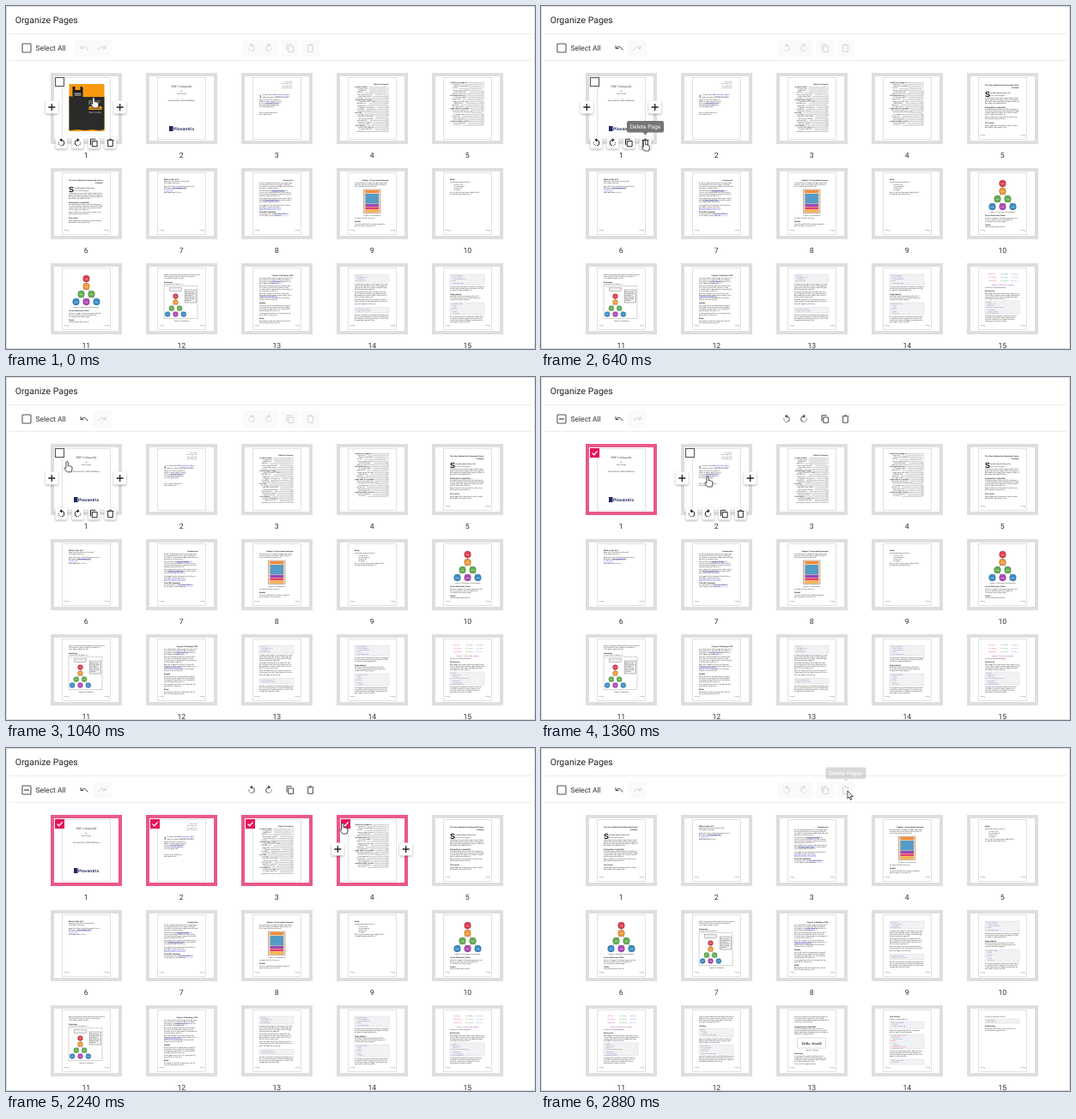
Recreate the animation shown at these times as an HTML page. Size 616 by 400 pixels, loop 2.96 s.

```html
<!DOCTYPE html>
<html lang="en">
<head>
<meta charset="utf-8">
<title>Organize Pages</title>
<style>
  html, body { margin: 0; width: 100%; height: 100%; overflow: hidden; background: #fff; }
  svg { display: block; width: 616px; height: 400px; font-family: Roboto, sans-serif; text-rendering: geometricPrecision; }
  .icon { fill: none; stroke: currentColor; stroke-width: 1; }
  .solid { fill: currentColor; stroke: none; }
  .button { color: #484848; }
  .button .plate { fill: none; }
  .button.off { color: #d4d4d4; }
  .button.off .plate { fill: #fafafa; }
  .frame { fill: #fff; stroke: #dedede; stroke-width: 4; }
  .selected .frame { stroke: #e8588a; }
  .box { fill: #fff; stroke: #555; stroke-width: 1.1; }
  .ticked .box { fill: #e3165b; stroke: #e3165b; }
  .tick { fill: none; stroke: #fff; stroke-width: 1.3; visibility: hidden; }
  .ticked .tick { visibility: visible; }
  .raised { fill: #fff; filter: drop-shadow(0 1px 1px #0005); }
  .page { font-family: "Liberation Sans", Arial, sans-serif; fill: #2c2c2c; }
  .serif { font-family: "Liberation Serif", serif; }
</style>
</head>
<body>
<svg id="stage" viewBox="0 0 616 400"></svg>
<script>
const LOOP = 2960, TICK = 80, PITCH = 111, COLUMNS = 5, LEADING = 2.05;
const stage = document.getElementById('stage');

let seed = 7;
const random = () => (seed = seed * 16807 % 2147483647) / 2147483647;
const vocabulary = 'the of a page and to in document is text file each with for object content'.split(' ');

function words(length) {
  let out = '';
  while (out.length < length) out += vocabulary[random() * vocabulary.length | 0] + ' ';
  return out.slice(0, length);
}

// Drawing helpers for the small document pages (56 x 73 units)
const text = (x, y, string, size = 2, extra = '') =>
  `<text x="${x}" y="${y}" font-size="${size}" ${extra}>${string}</text>`;
const rect = (x, y, w, h, fill, extra = '') =>
  `<rect x="${x}" y="${y}" width="${w}" height="${h}" fill="${fill}" ${extra}/>`;
const line = (x, y, w, extra = '') => text(x, y, words(Math.round(w / 0.89)), 2, extra);
const link = (x, y, w) => line(x, y, w, 'fill="#2433c8" text-decoration="underline"');
const para = (y, rows, w = 39, x = 7.5) => Array.from({ length: rows }, (_, i) =>
  line(x, y + i * LEADING, i === rows - 1 ? w * 0.65 : w)).join('');
const heading = (y, string) => text(7.5, y, string, 2.2, 'font-weight="bold" fill="#111"');
const title = (y, string) => text(47, y, string, 2.1, 'font-weight="bold" fill="#111" text-anchor="end"');
const centred = (y, string, size, extra = '') => text(28, y, string, size, `text-anchor="middle" ${extra}`);

// Paragraphs of four rows down to a given height
function flow(y, end) {
  let out = '';
  for (; y <= end; y += 4 * LEADING + 1) out += para(y, Math.min(4, Math.floor((end - y) / LEADING) + 1));
  return out;
}

function code(y, h, tints = ['#7777d0', '#888']) {
  let out = rect(7.5, y, 40, h, '#f1f2f4', 'stroke="#d8d8dc" stroke-width=".5"');
  for (let row = 0; row * LEADING + 2.4 < h; row++)
    out += line(9 + row % 3, y + 2.3 + row * LEADING, 6 + random() * 12, `fill="${tints[row % tints.length]}"`);
  return out;
}

function tree(x, y, scale) {
  const nodes = [[0, 0, '#e0404f'], [0, 9, '#f29a3c'], [-6, 18, '#62b050'], [6, 18, '#62b050'],
    [-12, 27, '#3c8fc8'], [0, 27, '#b04bb8'], [12, 27, '#3c8fc8']];
  return `<g transform="translate(${x} ${y}) scale(${scale})">
    <path d="M0 0V9L-12 27M0 9L12 27M-6 18L0 27L6 18" fill="none" stroke="#888" stroke-width=".6"/>` +
    nodes.map(([cx, cy, fill]) => `<circle cx="${cx}" cy="${cy}" r="3.9" fill="${fill}" stroke="#0005" stroke-width=".6"/>` +
      text(cx, cy + 0.7, 'node', 2, 'text-anchor="middle" fill="#fff"')).join('') + '</g>';
}

function contents(y, rows) {
  let out = '';
  for (let i = 0; i < rows; i++, y += 2.15) {
    const strong = i % 7 === 0, x = strong ? 8 : 10 + i % 3, w = 8 + random() * 13;
    out += line(x, y, w, strong ? 'font-weight="bold" fill="#111"' : '') + text(47, y, i + 5, 2, 'text-anchor="end"') +
      `<path d="M${x + w + 1} ${y - 0.3}H45" stroke="#444" stroke-width=".6" stroke-dasharray=".5 .4"/>`;
  }
  return out;
}

const footer = `<path d="M2 67.5h5v1.5M49 67.5h5v1.5" fill="none" stroke="#aaa" stroke-width=".6"/>`;
const body = (...parts) => parts.join('') + footer;

const cover = rect(8, 8, 41, 55, '#f79a10') +
  `<path d="M8 22l5 1 4-1 6 1h26V61l-6 1-8-1-8 1-9-1-10 1Z" fill="#2a2a2a"/>
  <path d="M12 11h11l1 1.5V23H12Z" fill="#1c1c1c"/>` + rect(15, 11, 6, 4, '#f79a10') + rect(14, 18, 8, 4, '#777') +
  text(30.5, 32, 'PDF', 7, 'fill="#bbb"') + rect(31, 34, 15, 4, '#f79a10') +
  text(32, 37.2, 'Unfussedly', 2.6, 'fill="#222"') + text(31, 42, 'Wren Tolsby', 2.6, 'fill="#ddd"') +
  '<path d="M10 47H46M10 51H46M10 55H46" stroke="#444" stroke-width=".7" stroke-dasharray="1 2"/>';

const titlePage = `<g class="serif">${centred(12, 'PDF Unfussedly', 3.6)}${centred(17, 'By', 2)}
  ${centred(20, 'Wren Tolsby', 2.2)}${centred(28, 'Foreword by Tobin Marlowe', 2.7)}</g>` +
  rect(13.5, 57, 4.5, 6, '#23285f') + text(18.5, 62.2, 'Plovantrix', 5, 'font-weight="bold" fill="#23285f"');

const copyright = [6, 8.3, 10.6, 12.9].map((y, i) =>
    text(46, y, words(9 + i * 3), 2, 'text-anchor="end" fill="#666"')).join('') +
  text(8, 24, 'I', 5, 'font-weight="bold"') + line(11, 21, 14) + link(25, 21, 19) + line(11, 24, 34) +
  para(27, 5, 27) + link(16, 31.1, 14) + para(42, 2, 24);

const story = body(title(9.5, 'The Story Behind the Unfussedly Series'), title(12.5, 'of Books'),
  text(7.5, 23, 'S', 9, 'font-weight="bold" fill="#111"'), line(14, 19, 24, 'font-weight="bold"'), line(14, 21.5, 18),
  flow(25, 32), heading(35.5, 'Information is plentiful'), flow(38, 51), heading(54, 'The series'), para(56.5, 2));

const stack = rect(18, 20, 19.5, 27.5, '#ecd2b0', 'stroke="#a77" stroke-width=".5"') +
  [[21, 3, '#f08b3c'], [25, 11.5, '#559bc8'], [37, 3, '#9a48ba'], [40.5, 2.5, '#e6406d'], [43.5, 3, '#f2b04a']]
    .map(([y, h, fill]) => rect(20, y, 15.5, h, fill)).join('');

const pages = [
  cover,
  titlePage,
  copyright,
  title(9, 'Table of Contents') + contents(12, 25),
  contents(7, 24),
  story,
  body(heading(8.5, 'What is this for?'), para(11, 2, 32), para(16.5, 2), link(18, 18.6, 17), link(7.5, 21, 12),
    para(24, 1, 30)),
  body(title(9.5, 'Introduction'), flow(12.5, 36), link(22, 21.6, 16), link(12, 32.8, 20), para(38.5, 2),
    link(7.5, 42.6, 24), heading(46.5, 'The PDF Standard'), para(49, 2), link(25, 49, 20)),
  body(title(9.5, 'Chapter 1  Conceptual Overview'), para(13, 3), stack, centred(50.5, 'Figure 1: Components', 2),
    para(53.5, 1), heading(58, 'Header'), para(60.5, 2)),
  body(heading(8.5, 'Body'), para(11.5, 1), para(14.5, 4, 12, 12), para(24, 2)),
  body(tree(28, 13, 1), centred(47, 'Figure 2: Structure of a document', 2), heading(51, 'Cross-Reference Table'),
    para(53.5, 3), heading(61.5, 'Trailer'), para(64, 1)),
  body(para(9, 3), heading(17.5, 'Summary'), para(20, 1),
    rect(7.5, 21.5, 39, 38, 'none', 'stroke="#777" stroke-width=".5" stroke-dasharray="1 .6"'),
    rect(14, 23.5, 14, 4, '#eee', 'stroke="#777" stroke-width=".4"'), tree(21, 33.5, 0.78),
    rect(32, 26, 13, 15, '#f2f2f2', 'stroke="#777" stroke-width=".5"'), para(28.5, 6, 11, 33),
    centred(62.5, 'Figure 3: Relations', 2)),
  body(title(9.5, 'Chapter 2  Building a PDF'), flow(13, 38), link(20, 17.1, 15), link(8, 33.5, 20),
    heading(42, 'Header'), flow(44.5, 56), heading(60, 'Body'), para(62.5, 2)),
  body(code(8, 9), flow(20, 44), code(46.5, 6), flow(55.5, 64)),
  body(code(8, 12), para(23, 3), heading(31.5, 'Page objects'), para(34, 3), code(41, 14), flow(58, 65)),
  body([0, 1, 2].map(i => line(12, 8 + i * 4, 9, 'fill="#e49"') + line(26, 8 + i * 4, 8, 'fill="#5a6"') +
    line(38, 8 + i * 4, 8, 'fill="#88d"')).join(''), centred(21, 'Figure 4: Parts of the sample', 2, 'fill="#a3a"'),
    para(24, 1), heading(28, 'Resources'), para(30.5, 4), code(39, 15), flow(57, 65)),
  body(flow(9, 16), heading(20, 'Catalog'), code(22, 10), para(35, 3), code(41, 11), flow(55, 64)),
  body(flow(9, 17), heading(20.5, 'Compiling the valid PDF'), flow(23, 31),
    rect(11, 33, 33, 12, '#fff', 'stroke="#bbb" stroke-width=".5"'),
    centred(40.5, 'Hello, World!', 4, 'class="serif" font-weight="bold"'), centred(48, 'Figure 5: Result', 2),
    heading(52, 'Summary'), flow(54.5, 65)),
  body(heading(9, 'Text blocks'), para(11.5, 1), code(14, 8), para(25, 2), code(29, 17, ['#d58', '#888', '#77d']),
    flow(49, 56), code(58, 6)),
  body(para(9, 1), code(11, 5), heading(20, 'Positioning'), para(22.5, 2))
];

// Interface parts
const undoShape = '<path d="M-4-2.8V.6H-.5M-3.8.4Q.5-4.4 4.3 2.4"/>';
const turnShape = '<path d="M-.5-3.2A3.3 3.3 0 0 1 .5 3.4"/><path stroke-dasharray="1.2 .8" d="M-.4 3.4A3.3 3.3 0 0 1-3-1"/><path class="solid" d="M.6-5.4v4.4L-2.2-3.2Z"/>';
const flip = shape => `<g transform="scale(-1 1)">${shape}</g>`;
const icons = {
  undo: undoShape, redo: flip(undoShape), left: turnShape, right: flip(turnShape),
  copy: '<path d="M-2.2-2h5.8v6.3h-5.8ZM-4 2.6v-6.8h5.9"/>',
  trash: '<path d="M-2.8-2.4v6.6h5.6v-6.6M-4-3.1h8M-1.3-4.3h2.6"/>',
  plus: '<path stroke-width="1.3" d="M-4 0h8M0-4v8"/>'
};
const icon = (name, x, y) => `<g class="icon" transform="translate(${x} ${y})">${icons[name]}</g>`;
const button = (name, x, w) =>
  `<g class="button ${name}"><rect class="plate" x="${x - w / 2}" y="39.5" width="${w}" height="19"/>${icon(name, x, 49)}</g>`;
const raised = (name, x, y, size) =>
  `<rect class="raised" x="${x - size / 2}" y="${y - size / 2}" width="${size}" height="${size}" rx="1.5"/>${icon(name, x, y)}`;
const tooltip = (id, x, y, w, label) => `<g id="${id}"><path fill="#757575" d="M${x - 3} ${y + 13}h6l-3 3.5Z"/>
  ${rect(x - w / 2, y, w, 13.5, '#757575', 'rx="2"')}${text(x, y + 9.2, label, 6.7, 'fill="#fff" text-anchor="middle"')}</g>`;

function cell(i) {
  const x = 52 + i % COLUMNS * PITCH, y = 78 + Math.floor(i / COLUMNS) * PITCH;
  return `<g class="cell" transform="translate(${x} ${y})">
    <rect class="frame" x="2" y="2" width="79" height="79"/>
    <use class="sheet" x="13.5" y="5"/>
    <g class="check"><rect class="box" x="5.5" y="5.5" width="10" height="10"/><path class="tick" d="M7.6 10.6l2.1 2.1 4-4.3"/></g>
    ${text(41.3, 99, i + 1, 8.7, 'fill="#333" text-anchor="middle"')}</g>`;
}

stage.innerHTML = `<defs>${pages.map((art, i) => `<g id="page${i}" class="page">
    ${rect(0, 0.5, 56, 72, '#fff', 'stroke="#dadada" stroke-width=".8"')}${art}</g>`).join('')}</defs>
  <rect width="616" height="400" fill="#fff"/>
  <rect x=".5" y=".5" width="615" height="399" fill="none" stroke="#dcdcdc"/>
  <path d="M4 32.5H612M4 63.5H612" stroke="#ececec"/>
  ${text(10.7, 20, 'Organize Pages', 10.5, 'fill="#222"')}
  <rect class="box" x="19" y="44" width="10" height="10" rx="1"/>
  <path id="partial" d="M21 49h6" stroke="#444" stroke-width="1.2"/>
  ${text(34.5, 52, 'Select All', 8.5, 'fill="#333"')}
  ${button('undo', 91, 21)}${button('redo', 112, 21)}
  ${button('left', 286, 20)}${button('right', 306, 20)}${button('copy', 331, 21)}${button('trash', 354.5, 21)}
  ${Array.from({ length: 15 }, (_, i) => cell(i)).join('')}
  <g id="inserts" color="#222">${raised('plus', 1.3, 40, 15)}${raised('plus', 80.7, 40, 15)}</g>
  <g id="tools" color="#222">${['left', 'right', 'copy', 'trash'].map((name, i) => raised(name, 12.5 + i * 19, 81.5, 14)).join('')}</g>
  ${tooltip('pageTip', 121.5, 134, 43, 'Delete Page')}${tooltip('pagesTip', 355, 22.5, 47, 'Delete Pages')}
  <g id="cursor">
    <path id="hand" fill="#fff" stroke="#222" stroke-width=".8" d="M-1.2.8Q-1.2-.3 0-.3T1.2.8V5l1-.3 1.4.3 1.2.4 1 .6V9L5 12H0L-3.4 7.6q.6-1.3 1.8-.3l.4.4Z"/>
    <path id="arrow" fill="#fff" stroke="#222" stroke-width=".8" d="M0 0V9l2-1.9 1.4 3.4 1.5-.7-1.4-3.2h2.8Z"/>
  </g>`;

// Timeline: [ms, value]
const selection = [[0, 0], [160, 1], [640, 0], [1200, 1], [1520, 2], [1680, 3], [2160, 4], [2800, 0]];
const removed = [[0, 0], [640, 1], [2800, 5]];
const path = [[0, 102, 107], [160, 62, 88], [320, 113, 154], [420, 120.5, 157], [800, 120.5, 157], [1120, 62, 88],
  [1200, 63, 88], [1360, 194, 116], [1500, 174, 88], [1560, 174, 88], [1680, 285, 88], [1760, 309, 119],
  [1840, 326, 118], [2080, 392, 88], [2320, 392, 88], [2520, 357, 50], [2960, 357, 50]];

const valueAt = (steps, t) => steps.filter(([start]) => start <= t).pop()[1];

function cursorAt(t) {
  const next = path.findIndex(([time]) => time > t);
  const [t0, x0, y0] = path[next - 1], [t1, x1, y1] = path[next];
  const k = (t - t0) / (t1 - t0), ease = k * k * (3 - 2 * k);
  return [x0 + (x1 - x0) * ease, y0 + (y1 - y0) * ease];
}

const find = id => document.getElementById(id);
const show = (element, on) => { element.style.display = on ? '' : 'none'; };
const cells = [...document.querySelectorAll('.cell')].map(element => ({
  element, sheet: element.querySelector('.sheet'), check: element.querySelector('.check')
}));
const disable = (names, off) => names.forEach(name =>
  document.querySelector('.button.' + name).classList.toggle('off', off));

function render(t) {
  const count = valueAt(selection, t), offset = valueAt(removed, t), [x, y] = cursorAt(t);
  const hovered = y >= 78 && y < 170 ? Math.floor((x - 40) / PITCH) : -1;

  cells.forEach(({ element, sheet, check }, i) => {
    sheet.setAttribute('href', '#page' + (i + offset));
    element.classList.toggle('selected', i < count);
    check.classList.toggle('ticked', i < count);
    show(check, i < count || i === hovered);
  });

  show(find('partial'), count > 0);
  disable(['undo'], offset === 0);
  disable(['redo'], true);
  disable(['left', 'right', 'copy', 'trash'], count === 0);

  for (const id of ['inserts', 'tools']) {
    show(find(id), hovered >= 0 && (id === 'inserts' || count < 2));
    find(id).setAttribute('transform', `translate(${52 + hovered * PITCH} 78)`);
  }
  show(find('pageTip'), t >= 480 && t < 880);
  show(find('pagesTip'), t >= 2560);
  find('pagesTip').setAttribute('opacity', t >= 2880 ? 0.28 : 1);

  const pointing = hovered >= 0 || (y < 60 && count > 0);
  show(find('hand'), pointing);
  show(find('arrow'), !pointing);
  find('cursor').setAttribute('transform', `translate(${x} ${y})`);
}

const start = performance.now();
let shown = -1;
function loop() {
  const t = Math.floor((performance.now() - start) % LOOP / TICK) * TICK;
  if (t !== shown) render(shown = t);
  requestAnimationFrame(loop);
}
loop();
</script>
</body>
</html>
```
